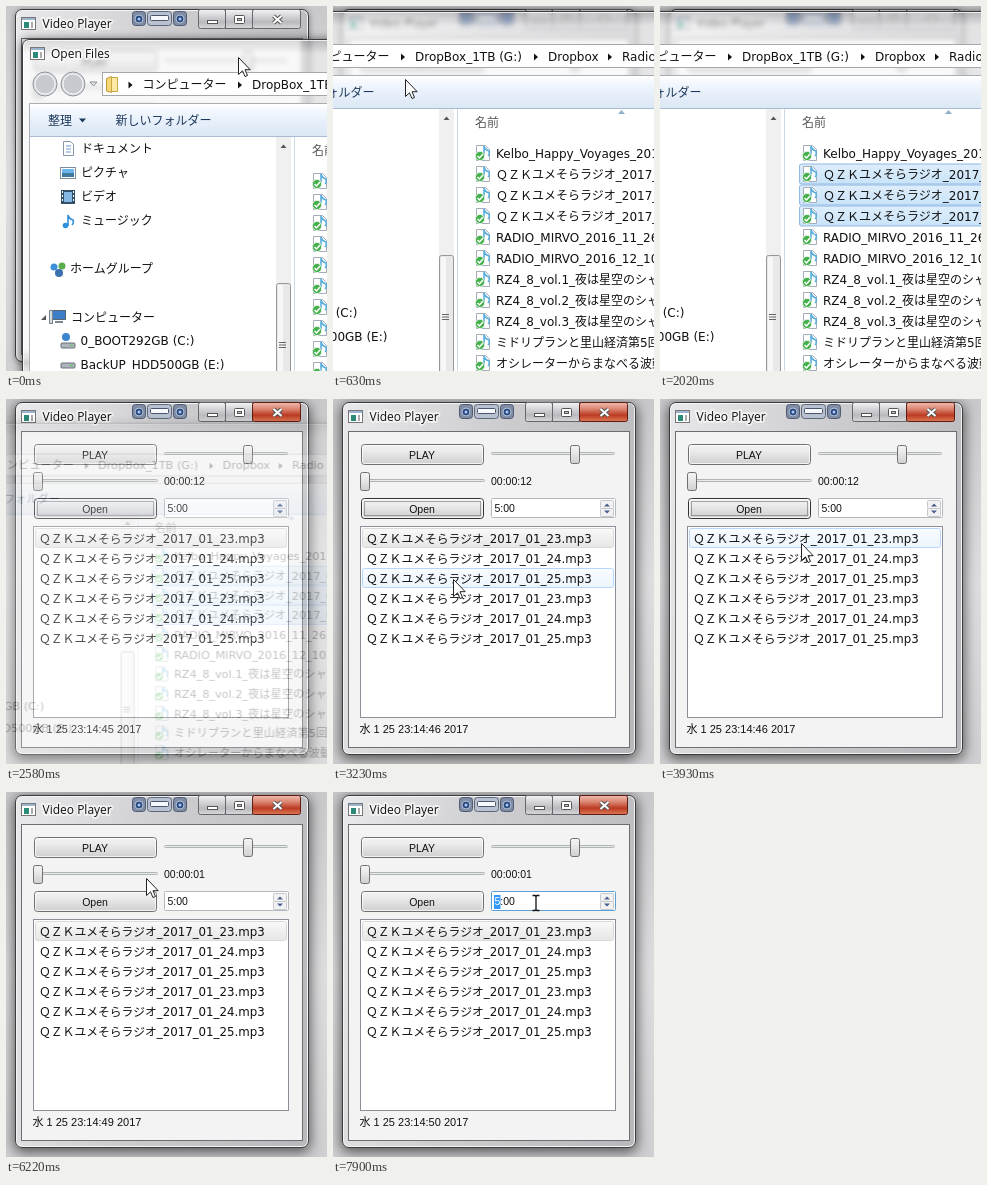
These frames come from a looping animation (321 px wide and 365 px high, 8000 ms). An HTML page:

```html
<!DOCTYPE html>
<html lang="ja">
<head>
<meta charset="utf-8">
<title>Video Player</title>
<style>
  html, body { margin: 0; width: 100%; height: 100%; overflow: hidden; }
  #stage { position: relative; width: 321px; height: 365px; overflow: hidden;
    background: linear-gradient(#c9c9cb, #dedee0 50%, #cfcfd1); }
  #stage > *, #dialog > * { position: absolute; }
  svg { left: 0; top: 0; overflow: visible; white-space: pre; }
  .frame { border: 1px solid #3c3c3f; border-radius: 7px; box-sizing: border-box; }
  #shell { left: 9px; top: 3px; width: 294px; height: 353px;
    background: linear-gradient(100deg, #e9e9eb, #cdcdd0 45%, #b8b8bc);
    box-shadow: inset 0 0 0 1px #f4f4f6, 0 1px 6px rgba(0,0,0,.4); }
  .active #shell { box-shadow: inset 0 0 0 1px #f4f4f6, 0 3px 13px 1px rgba(0,0,0,.62); }
  #dialog { left: 0; top: 0; width: 321px; height: 365px; transform-origin: 241px 304px; }
  #glass { left: 16px; top: 33px; width: 760px; height: 520px; backdrop-filter: blur(2.5px);
    background: linear-gradient(rgba(70,70,76,.16), rgba(255,255,255,.45) 14px, rgba(255,255,255,.45));
    box-shadow: inset 0 0 0 1px rgba(255,255,255,.75), 0 1px 9px 1px rgba(0,0,0,.55); }
  text { font: 12px "DejaVu Sans", "Noto Sans CJK JP", sans-serif; fill: #111; }
  .title { font: 12px "Open Sans", "Noto Sans", sans-serif; stroke: #fff; stroke-width: 4px;
    stroke-opacity: .55; paint-order: stroke; stroke-linejoin: round; }
  .ui { font: 10.5px "Liberation Sans", "Noto Sans CJK JP", sans-serif; }
  .clock { font-size: 11px; }
  .entry { font-size: 11.8px; }
  .tool { fill: #1e395b; }
  .mid { text-anchor: middle; }
</style>
</head>
<body>
<div id="stage">
  <div id="shell" class="frame"></div>
  <svg id="player" width="321" height="365"></svg>
  <div id="dialog">
    <div id="glass" class="frame"></div>
    <svg id="browser" width="321" height="365"></svg>
  </div>
  <svg id="pointer" width="321" height="365">
    <path id="arrow" d="M.5 .5V17.5L4.5 13.8L7 19.5L9.5 18.5L7 12.7H12.2Z" fill="#fff" stroke="#222"/>
    <path id="beam" d="M-3.5 -7.5H-1L0 -6.5L1 -7.5H3.5M0 -6.5V6.5M-3.5 7.5H-1L0 6.5L1 7.5H3.5" fill="none" stroke="#111" stroke-width="1.3"/>
  </svg>
</div>
<script>
const LOOP = 8000;
const $ = id => document.getElementById(id);

// Step tables: [start time, ...values], each held until the next step.
const dialogSteps = [ // dx, dy, scale, opacity
  [0, 0, 0, 1, 1], [120, -42, -7, 1, 1], [250, -102, -18, 1, 1], [370, -152, -27, 1, 1],
  [500, -164, -28, 1, 1], [2420, -164, -28, .97, .65], [2580, -164, -28, .937, .25], [2720, -164, -28, .9, 0]
];
const pointerSteps = [
  [0, 232, 51], [120, 190, 44], [250, 130, 33], [370, 80, 24], [500, 68, 23], [630, 72, 73],
  [790, 85, 84], [950, 100, 92], [1100, 112, 98], [1240, 150, 112], [1370, 180, 150],
  [1500, 190, 170], [1630, 194, 186], [1760, 198, 208], [1890, 206, 310], [2020, 400, 400],
  [2850, 132, 335], [2980, 126, 270], [3100, 121, 212], [3230, 120, 180], [3380, 123, 173],
  [3510, 128, 166], [3650, 133, 158], [3790, 138, 150], [3930, 141, 144], [4060, 141, 142],
  [5250, 131, 115], [5380, 112, 80], [5510, 101, 58], [5640, 98, 56], [5950, 112, 66],
  [6090, 140, 86], [6230, 162, 103], [6370, 166, 110], [6640, 168, 111], [7330, 174, 111],
  [7470, 183, 111], [7610, 192, 111], [7750, 200, 111], [7900, 203, 111]
];
const clockSteps = [[0, 43], [1100, 44], [2020, 45], [3100, 46], [4060, 47], [5110, 48], [6090, 49], [7060, 50]];
const pickedSteps = [[0, 0], [1630, 1], [1760, 3]];
const playSteps = [[0, "PLAY", "00:00:12"], [4670, "PAUSE", "00:00:00"], [5640, "PLAY", "00:00:01"]];

function at(steps, t) {
  let held = steps[0];
  for (const step of steps) if (step[0] <= t) held = step;
  return held.slice(1);
}

const rect = (x, y, w, h, fill, stroke = "none", r = 0, extra = "") =>
  `<rect x="${x}" y="${y}" width="${w}" height="${h}" fill="${fill}" stroke="${stroke}" rx="${r}" ${extra}/>`;
const text = (x, y, s, cls = "", extra = "") => `<text x="${x}" y="${y}" class="${cls}" ${extra}>${s}</text>`;
const path = (d, fill, stroke = "none", w = 1, extra = "") =>
  `<path d="${d}" fill="${fill}" stroke="${stroke}" stroke-width="${w}" ${extra}/>`;
const dot = (x, y, r, fill, stroke = "none") => `<circle cx="${x}" cy="${y}" r="${r}" fill="${fill}" stroke="${stroke}"/>`;
const gradient = (id, ...colors) => `<linearGradient id="${id}" x2="0" y2="1">` +
  colors.map((c, i) => `<stop offset="${i / (colors.length - 1)}" stop-color="${c}"/>`).join("") + "</linearGradient>";
const appIcon = (x, y) => rect(x + .5, y + .5, 14, 12, "#fff", "#777") +
  rect(x + 1, y + 1, 13, 2, "#9db4cf") + rect(x + 3, y + 5, 5, 6, "#2c8a78") + rect(x + 10, y + 5, 2, 6, "#aaa");

const defs = "<defs>" +
  gradient("face", "#f3f3f3", "#ebebeb", "#dcdcdc", "#cfcfcf") +
  gradient("faceHot", "#eaf6fd", "#d9f0fc", "#bee6fd", "#a7d9f5") +
  gradient("chosen", "#dcebfc", "#c1dbfc") + gradient("picked", "#deeefb", "#c9e3f8") +
  gradient("hover", "#fafcff", "#ebf4fd") + gradient("idle", "#f9f9f9", "#e6e6e6") +
  gradient("close", "#eebcb0", "#dc8673", "#bc3a22", "#dd7a58") +
  gradient("caption", "#f4f4f6", "#d6d6da", "#b9b9be", "#d8d8dc") +
  gradient("bar", "#fafcff", "#e6effa", "#dce7f5") + "</defs>";

function buildPlayer() {
  const button = (id, y, label) => rect(28.5, y + .5, 122, 20, "url(#face)", "#707070", 3, `id="${id}"`) +
    rect(29.5, y + 1.5, 120, 18, "none", "#fff", 2, 'opacity=".7"') +
    text(89, y + 14.5, label, "ui mid", `id="${id}Label"`);
  const slider = (x, y, knob) => rect(x + .5, y - 1.5, 123, 2, "#e7eaea", "#b0b4b4", 1) +
    rect(knob + .5, y - 8.5, 9, 18, "url(#face)", "#707070", 2);
  const trayEnd = x => rect(x - 6.5, 5.5, 13, 14, "#7f8ca3", "#4f5b70", 3) +
    dot(x, 13, 4, "#2c4a80", "#b4c3da") + dot(x, 13, 1.5, "#a9c8f2");
  const tray = trayEnd(133) + trayEnd(174) + rect(141.5, 5.5, 24, 14, "#b9c1d0", "#5b677c", 3) +
    rect(144.5, 9.5, 18, 5, "#f6f8fb", "#4c566a", 1);
  const caption = rect(192.5, 3.5, 27, 19, "url(#caption)", "#66666c", 2) +
    rect(219.5, 3.5, 27, 19, "url(#caption)", "#66666c") +
    rect(246.5, 3.5, 48, 19, "url(#caption)", "#66666c", 2, 'id="closeBox"') +
    rect(201.5, 14.5, 10, 3, "#fff", "#555") + rect(228.5, 9.5, 10, 8, "#fff", "#555", 1) +
    rect(231.5, 12.5, 4, 2, "#c4c4c8", "#555") +
    path("M267.5 10L275.5 17M275.5 10L267.5 17", "none", "#555", 4) +
    path("M267.5 10L275.5 17M275.5 10L267.5 17", "none", "#fff", 2);
  const days = [23, 24, 25, 23, 24, 25];
  const rows = days.map((d, i) => rect(29.5, 129.5 + i * 20, 251, 19, "none", "none", 2, `id="row${i}"`) +
    text(33, 143.5 + i * 20, `ＱＺＫユメそらラジオ_2017_01_${d}.mp3`, "entry")).join("");
  $("player").innerHTML = defs + appIcon(15, 11) + text(36.5, 21.5, "Video Player", "title") + tray + caption +
    rect(15.5, 32.5, 281, 316, "#f3f3f3", "#6d6d70") +
    button("play", 45, "PLAY") + slider(158, 55, 237) + slider(28, 82, 27) +
    text(158, 86, "", "ui", 'id="elapsed"') + button("open", 99, "Open") +
    rect(31.5, 102.5, 116, 14, "none", "#555", 0, 'id="openFocus" stroke-dasharray="1 1"') +
    rect(158.5, 99.5, 124, 19, "#fff", "#b5b8bc", 1, 'id="spin"') +
    rect(161, 103, 6.5, 14, "#3399ff", "none", 0, 'id="digitBox"') +
    text(161.5, 112.5, '<tspan id="digit">5</tspan>:00', "ui") +
    rect(267.5, 101.5, 13, 8, "#f2f2f2", "#c4c7cc", 1) + rect(267.5, 109.5, 13, 8, "#f2f2f2", "#c4c7cc", 1) +
    path("M271 107.5L274 104.5L277 107.5ZM271 111.5L274 114.5L277 111.5Z", "#4a5f8c") +
    rect(27.5, 127.5, 255, 191, "#fff", "#8a8f98") + rows + text(26.5, 334, "", "ui clock", 'id="clock"');
}

function buildBrowser() {
  const crumb = (x, s) => path(`M${x - 14} 75.5v7l4 -3.5z`, "#111") + text(x, 82.5, s);
  const note = (x, y, c) => path(`M${x} ${y + 5}V${y - 6}q1 4 5 5q1 3 -1 5`, "none", c, 1.6) + dot(x - 2.5, y + 4.5, 2.8, c);
  const page = (x, y) => path(`M${x + .5} ${y - 7.5}h9l4 4v11h-13z`, "#fff", "#a4adb8") + note(x + 8, y - 1, "#5aaedc") +
    dot(x + 4, y + 3, 4.6, "#45b04c", "#e3f3e3") + path(`M${x + 1.5} ${y + 3}l2 2l3.5 -4`, "none", "#fff", 1.5);
  const drive = y => rect(55, y, 14, 5, "#aeb4bc", "#69717c", 1) + rect(64, y + 2, 3, 1, "#4fd04a");
  const files = ["Kelbo_Happy_Voyages_2017_01_21.mp3",
    ...[23, 24, 25].map(d => `ＱＺＫユメそらラジオ_2017_01_${d}.mp3`),
    "RADIO_MIRVO_2016_11_26.mp3", "RADIO_MIRVO_2016_12_10.mp3",
    ...[1, 2, 3].map(n => `RZ4_8_vol.${n}_夜は星空のシャトル.mp3`),
    "ミドリプランと里山経済第5回.mp3", "オシレーターからまなべる波動.mp3"];
  const list = files.map((name, i) => {
    const y = 175 + i * 21;
    return rect(303.5, y - 10, 420, 20, "none", "none", 2, `id="file${i}"`) + page(307, y) + text(327, y + 4.5, name);
  }).join("");
  const nav = ["ドキュメント", "ピクチャ", "ビデオ", "ミュージック"].map((s, i) => text(75, 146.5 + i * 24.2, s)).join("") +
    path("M57.5 135.5h7l3 3v11h-10z", "#fff", "#8796a8") + path("M60 140h5M60 143h5M60 146h5", "none", "#6c9bd0") +
    rect(54.5, 161.5, 15, 11, "#fff", "#7d8ea0") + rect(56, 163, 12, 4, "#6bb5ea") + rect(56, 167, 12, 4, "#3f7a9c") +
    rect(55, 184, 14, 14, "#33506d") + rect(58, 186, 8, 10, "#85b9e4") +
    path("M56.5 185v12M67.5 185v12", "none", "#fff", 1, 'stroke-dasharray="2 2"') +
    note(62, 215, "#2f8fd8") +
    text(64, 267, "ホームグループ") + dot(48, 261, 3.5, "#3d8fd8") + dot(56, 260, 3.5, "#58b04a") + dot(53, 267, 4, "#3b6fb0") +
    text(65, 315.5, "コンピューター") + path("M35 314h5v-5z", "#555") +
    rect(46.5, 304.5, 13, 9, "#3d7fc6", "#5c6670") + rect(49, 315, 8, 2, "#7c8690") + rect(43.5, 304.5, 3, 13, "#d5dae0", "#7c8690") +
    text(74.5, 339, "0_BOOT292GB (C:)") + drive(337) + dot(60, 331, 4, "#3c86d0") +
    text(74.5, 363, "BackUP_HDD500GB (E:)") + drive(357);
  const grip = [336, 338.5, 341].map(y => rect(273, y, 7, 1, "#666")).join("");
  $("browser").innerHTML = appIcon(24, 41) + text(45, 52, "Open Files", "title") +
    dot(39, 78, 12, "#d9dce0", "#8f949b") + dot(39, 78, 10, "#c6cacf", "#f4f5f7") +
    dot(67, 78, 12, "#d9dce0", "#8f949b") + dot(67, 78, 10, "#c6cacf", "#f4f5f7") +
    path("M84 76h7l-3.5 4z", "#e4e6e9", "#8a8f96") +
    rect(96.5, 66.5, 560, 23, "#fff", "#a3a8ae") +
    path("M100.5 72.5l5 -2v16l-5 -1.5z", "#f6d775", "#bd9a3a") + path("M105.5 71.5h6v14h-6z", "#fbe9a4", "#c7a545") +
    crumb(136.5, "コンピューター") + crumb(246, "DropBox_1TB (G:)") + crumb(379, "Dropbox") + crumb(453, "Radio") +
    rect(23.5, 97.5, 745, 448, "#fff", "#a9aeb5") + rect(24, 98, 744, 33, "#fff") +
    rect(24, 100, 744, 31, "url(#bar)") + rect(24, 130, 744, 1, "#a9bbd2") +
    text(42, 118.5, "整理", "tool") + path("M73 112.5h7l-3.5 4z", "#1e395b") + text(109.5, 118.5, "新しいフォルダー", "tool") +
    nav + rect(270, 131, 15, 414, "#f0f0f0") + path("M274.5 142l3 -3.5l3 3.5z", "#555") +
    rect(270.5, 277.5, 14, 180, "#e8e8e8", "#979797", 2) + rect(272, 279, 5, 177, "#f7f7f7") + grip +
    rect(288, 131, 1, 414, "#cfdae8") +
    rect(290, 132, 440, 24, "none", "none", 0, 'id="header"') + text(306, 149, "名前", "", 'fill-opacity=".7"') +
    path("M449 136l3.5 -4l3.5 4z", "#8fb0cc") + list;
}

const paint = (id, fill, stroke) => { $(id).setAttribute("fill", fill); $(id).setAttribute("stroke", stroke); };
const show = (id, visible) => { $(id).style.display = visible ? "" : "none"; };
const inside = (x, y, left, top, right, bottom) => x >= left && x < right && y >= top && y < bottom;

function drawDialog(t, x, y, browsing) {
  const [dx, dy, scale, opacity] = at(dialogSteps, t);
  const [picked] = at(pickedSteps, t);
  $("dialog").style.transform = `scale(${scale}) translate(${dx}px, ${dy}px)`;
  $("dialog").style.opacity = opacity;
  show("dialog", opacity > 0);

  const overHeader = browsing && inside(x, y, 125, 104, 321, 128);
  paint("header", overHeader ? "url(#hover)" : "none", overHeader ? "#b8d6fb" : "none");
  for (let i = 0; i < 11; i++) {
    const top = 136.5 + i * 21;
    if (i >= 1 && i <= picked) paint("file" + i, "url(#picked)", "#8fb8e4");
    else if (browsing && inside(x, y, 139, top, 321, top + 21)) paint("file" + i, "url(#hover)", "#b8d6fb");
    else paint("file" + i, "none", "none");
  }
}

function drawPlayer(t, x, y, active) {
  const [label, elapsed] = at(playSteps, t);
  $("stage").className = active ? "active" : "";
  paint("closeBox", active ? "url(#close)" : "url(#caption)", active ? "#5e1d12" : "#66666c");

  for (let i = 0; i < 6; i++) {
    const top = 129 + i * 20;
    if (i === 0 && t >= 4360 && t < 5640) paint("row0", "url(#chosen)", "#7da2ce");
    else if (active && inside(x, y, 29, top, 281, top + 20)) paint("row" + i, "url(#hover)", "#b8d6fb");
    else if (i === 0) paint("row0", "url(#idle)", "#d9d9d9");
    else paint("row" + i, "none", "none");
  }

  const openFocused = t < 4360;
  for (const [id, top] of [["play", 45], ["open", 99]]) {
    const over = active && inside(x, y, 28, top, 151, top + 21);
    paint(id, over ? "url(#faceHot)" : "url(#face)", over ? "#3c7fb1" : "#707070");
  }
  if (openFocused) paint("open", "url(#face)", "#333");
  show("openFocus", openFocused);

  const digitChosen = t >= 6640;
  paint("spin", "#fff", t >= 6370 ? "#5c9fd6" : "#b5b8bc");
  show("digitBox", digitChosen);
  $("digit").style.fill = digitChosen ? "#fff" : "";
  $("playLabel").textContent = label;
  $("elapsed").textContent = elapsed;
  $("clock").textContent = `水 1 25 23:14:${at(clockSteps, t)[0]} 2017`;
}

function draw(t) {
  const [x, y] = at(pointerSteps, t);
  const active = t >= 2420;
  drawDialog(t, x, y, t > 1200 && !active);
  drawPlayer(t, x, y, active);

  const editing = active && inside(x, y, 158, 99, 266, 120);
  show("arrow", !editing);
  show("beam", editing);
  $("pointer").style.transform = `translate(${x}px, ${y}px)`;
}

buildPlayer();
buildBrowser();
const start = performance.now();
function tick() {
  draw((performance.now() - start) % LOOP);
  requestAnimationFrame(tick);
}
tick();
</script>
</body>
</html>
```
